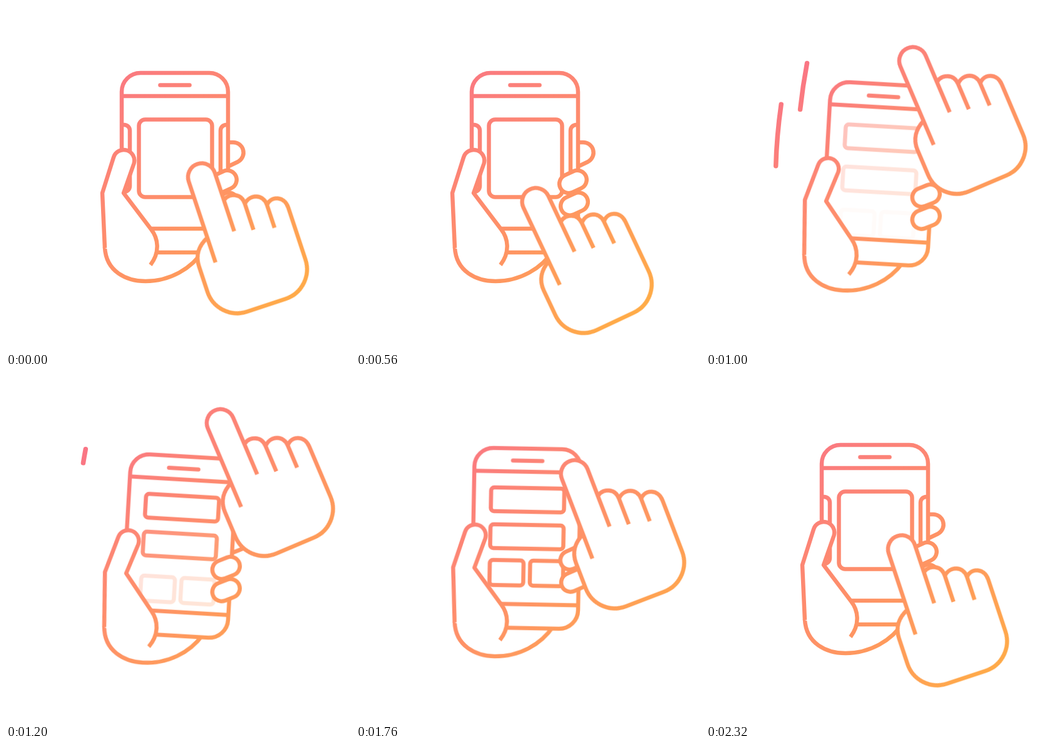
An HTML page without scripts for the animation above (2.36 s loop, 550 px wide and 550 px high).

```html
<!DOCTYPE html>
<html lang="en">
<head>
<meta charset="utf-8">
<title>Phone swipe</title>
<style>
  html, body { margin: 0; width: 100%; height: 100%; overflow: hidden; background: #fff; }
  svg { display: block; width: 100%; height: 100%; isolation: isolate; }
  .ink { fill: #fff; stroke: #000; stroke-width: 6.5; stroke-linejoin: round; }
  .line { fill: none; }
  .tint { mix-blend-mode: screen; }

  .scene, .hand-x, .hand-y, .hand-turn, .card, .sides, .row, .streak {
    animation: 2360ms linear infinite;
  }

  .scene { transform-origin: 270px 126px; animation-name: tilt; }
  @keyframes tilt {
    0%, 26.27% { transform: translate(0, 0) rotate(0deg); animation-timing-function: cubic-bezier(.42, 0, .4, 1); }
    45.76% { transform: translate(14.3px, 18.6px) rotate(3.4deg); animation-timing-function: cubic-bezier(.6, 0, .42, 1); }
    94.92%, 100% { transform: translate(0, 0) rotate(0deg); }
  }

  /* The swiping hand: each axis has its own easing, which bends its path */
  .hand-x { animation-name: hand-x; }
  @keyframes hand-x {
    0% { transform: translateX(313px); animation-timing-function: ease-in-out; }
    22.03% { transform: translateX(287.5px); animation-timing-function: cubic-bezier(.82, 0, .42, 1); }
    51.9% { transform: translateX(343px); }
    61.02% { transform: translateX(343.5px); animation-timing-function: ease-in-out; }
    72.88% { transform: translateX(350px); animation-timing-function: ease-in-out; }
    98.3%, 100% { transform: translateX(313px); }
  }
  .hand-y { animation-name: hand-y; }
  @keyframes hand-y {
    0% { transform: translateY(273.5px); animation-timing-function: cubic-bezier(.33, 0, .45, 1); }
    19.4% { transform: translateY(319.5px); animation-timing-function: cubic-bezier(.5, 0, .03, 1); }
    55.93% { transform: translateY(70px); }
    62.71% { transform: translateY(71.8px); animation-timing-function: cubic-bezier(.35, 0, .33, 1); }
    98.3%, 100% { transform: translateY(273.5px); }
  }
  .hand-turn { animation-name: hand-turn; }
  @keyframes hand-turn {
    0% { transform: rotate(-18.3deg); animation-timing-function: ease-in-out; }
    16.95%, 27.12% { transform: rotate(-25.2deg); animation-timing-function: ease-in-out; }
    42.37% { transform: rotate(-23deg); }
    62.71% { transform: rotate(-22.9deg); animation-timing-function: cubic-bezier(.33, 0, .33, 1); }
    98.3%, 100% { transform: rotate(-18.3deg); }
  }

  .card { animation-name: card; }
  @keyframes card {
    0%, 23.73% { transform: translateY(0); opacity: 1; animation-timing-function: ease-in; }
    30.51% { transform: translateY(-12px); opacity: 1; }
    37.29% { transform: translateY(-42px); opacity: 0; animation-timing-function: step-end; }
    84.75% { transform: translateY(0); opacity: 0; }
    98.3%, 100% { transform: translateY(0); opacity: 1; }
  }
  .sides { animation-name: sides; }
  @keyframes sides {
    0%, 27.12% { opacity: 1; }
    30.51% { opacity: .45; }
    33.5%, 87% { opacity: 0; }
    98.3%, 100% { opacity: 1; }
  }

  .row1 { animation-name: row1; }
  .row2 { animation-name: row2; }
  .row3 { animation-name: row3; }
  @keyframes row1 {
    0%, 35.59% { transform: translateY(30px); opacity: 0; }
    42.37% { transform: translateY(4.5px); opacity: .48; }
    49.15%, 79.66% { transform: translateY(0); opacity: 1; }
    88.14%, 100% { transform: translateY(0); opacity: 0; }
  }
  @keyframes row2 {
    0%, 37.29% { transform: translateY(30px); opacity: 0; }
    42.37% { transform: translateY(13px); opacity: .24; animation-timing-function: ease-out; }
    54.24%, 79.66% { transform: translateY(0); opacity: 1; }
    88.14%, 100% { transform: translateY(0); opacity: 0; }
  }
  @keyframes row3 {
    0%, 38.14% { transform: translateY(30px); opacity: 0; }
    42.37% { transform: translateY(25px); opacity: .04; }
    61.02% { transform: translateY(3px); opacity: .5; }
    69.49%, 79.66% { transform: translateY(0); opacity: 1; }
    88.14%, 100% { transform: translateY(0); opacity: 0; }
  }

  .streak { fill: none; stroke-width: 7.5; stroke-linecap: round; }
  .streak1 { animation-name: streak1; }
  .streak2 { animation-name: streak2; }
  @keyframes streak1 {
    0%, 28.8% { visibility: hidden; stroke-dasharray: 0 300; stroke-dashoffset: 0; }
    28.9% { visibility: visible; stroke-dasharray: 0 300; stroke-dashoffset: 0; }
    30.51% { visibility: visible; stroke-dasharray: 7 300; stroke-dashoffset: 0; }
    37.29% { visibility: visible; stroke-dasharray: 50 300; stroke-dashoffset: -10; }
    42.37% { visibility: visible; stroke-dasharray: 35 300; stroke-dashoffset: -51; }
    47.4% { visibility: visible; stroke-dasharray: 0 300; stroke-dashoffset: -100; }
    47.5%, 100% { visibility: hidden; stroke-dasharray: 0 300; stroke-dashoffset: -100; }
  }
  @keyframes streak2 {
    0%, 30.4% { visibility: hidden; stroke-dasharray: .1 300; stroke-dashoffset: 0; }
    30.5% { visibility: visible; stroke-dasharray: .1 300; stroke-dashoffset: 0; }
    37.29% { visibility: visible; stroke-dasharray: 42 300; stroke-dashoffset: 0; }
    42.37% { visibility: visible; stroke-dasharray: 62 300; stroke-dashoffset: -8; }
    49.15% { visibility: visible; stroke-dasharray: 30 300; stroke-dashoffset: -65; }
    52.4% { visibility: visible; stroke-dasharray: 0 300; stroke-dashoffset: -100; }
    52.5%, 100% { visibility: hidden; stroke-dasharray: 0 300; stroke-dashoffset: -100; }
  }
</style>
</head>
<body>
<svg viewBox="0 0 550 550">
  <defs>
    <linearGradient id="warm" gradientUnits="userSpaceOnUse" x1="100" y1="50" x2="480" y2="460">
      <stop offset="0" stop-color="#f86e8c"/>
      <stop offset=".5" stop-color="#fe8d6c"/>
      <stop offset="1" stop-color="#ffab47"/>
    </linearGradient>
    <rect id="finger" x="-22.5" y="-15" width="45" height="30" rx="15"/>
  </defs>
  <rect width="550" height="550" fill="#fff"/>

  <g class="ink">
    <path class="streak streak1" pathLength="100" d="M145 276Q144 170 167.500 62"/>
    <path class="streak streak2" pathLength="100" d="M111.500 269Q112 195 128 110"/>

    <g class="scene">
      <!-- palm and far finger, behind the phone -->
      <path d="M158 386C160 425 193 440 223 440C262 440 297 420 316 390"/>
      <path d="M350 218H362A16.500 16.500 0 0 1 371 249L350 259"/>

      <rect x="185" y="107" width="170" height="287" rx="30"/>
      <path class="line" d="M185 144H355M185 356H355"/>
      <path class="line" stroke-linecap="round" d="M246.500 126.500H293.500"/>

      <g class="sides line">
        <path d="M187 190h2a9 9 0 0 1 9 9v89a9 9 0 0 1 -9 9h-2"/>
        <path d="M354 190h-2a9 9 0 0 0 -9 9v89a9 9 0 0 0 9 9h2"/>
      </g>
      <rect class="card" x="212.5" y="181.5" width="117" height="124" rx="10"/>
      <rect class="row row1" x="212.5" y="170" width="117" height="38" rx="5"/>
      <rect class="row row2" x="212.5" y="229" width="117" height="38" rx="5"/>
      <g class="row row3">
        <rect x="212.5" y="286" width="54" height="40" rx="5"/>
        <rect x="277" y="286" width="53" height="40" rx="5"/>
      </g>

      <use href="#finger" transform="translate(347 281) rotate(-25)"/>
      <use href="#finger" transform="translate(349 316.5) rotate(-25)"/>
      <!-- thumb, over the phone -->
      <path d="M158 387L154 299L172 242A17 17 0 0 1 204.500 252L188 299L232 357C243 371 247 393 231 414"/>
    </g>

    <g class="hand-x"><g class="hand-y"><g class="hand-turn">
      <path stroke="none" d="M-22 0A22 22 0 0 1 22 0V46C34 38 52 44 52 62C64 50 85 56 85 75C96 63 116 70 116 90V177A50 50 0 0 1 66 227H1A50 50 0 0 1 -49 177V134C-49 115 -38 102 -22 95Z"/>
      <path class="line" d="M-22 136.500V0A22 22 0 0 1 22 0V98.500"/>
      <path class="line" d="M22 46C34 38 52 44 52 62V106"/>
      <path class="line" d="M52 62C64 50 85 56 85 75V113.500"/>
      <path class="line" d="M85 75C96 63 116 70 116 90V177A50 50 0 0 1 66 227H1A50 50 0 0 1 -49 177V134C-49 115 -38 102 -22 95"/>
    </g></g></g>
  </g>

  <!-- turns black ink into the stage-wide gradient, leaves white alone -->
  <rect class="tint" width="550" height="550" fill="url(#warm)"/>
</svg>
</body>
</html>
```
